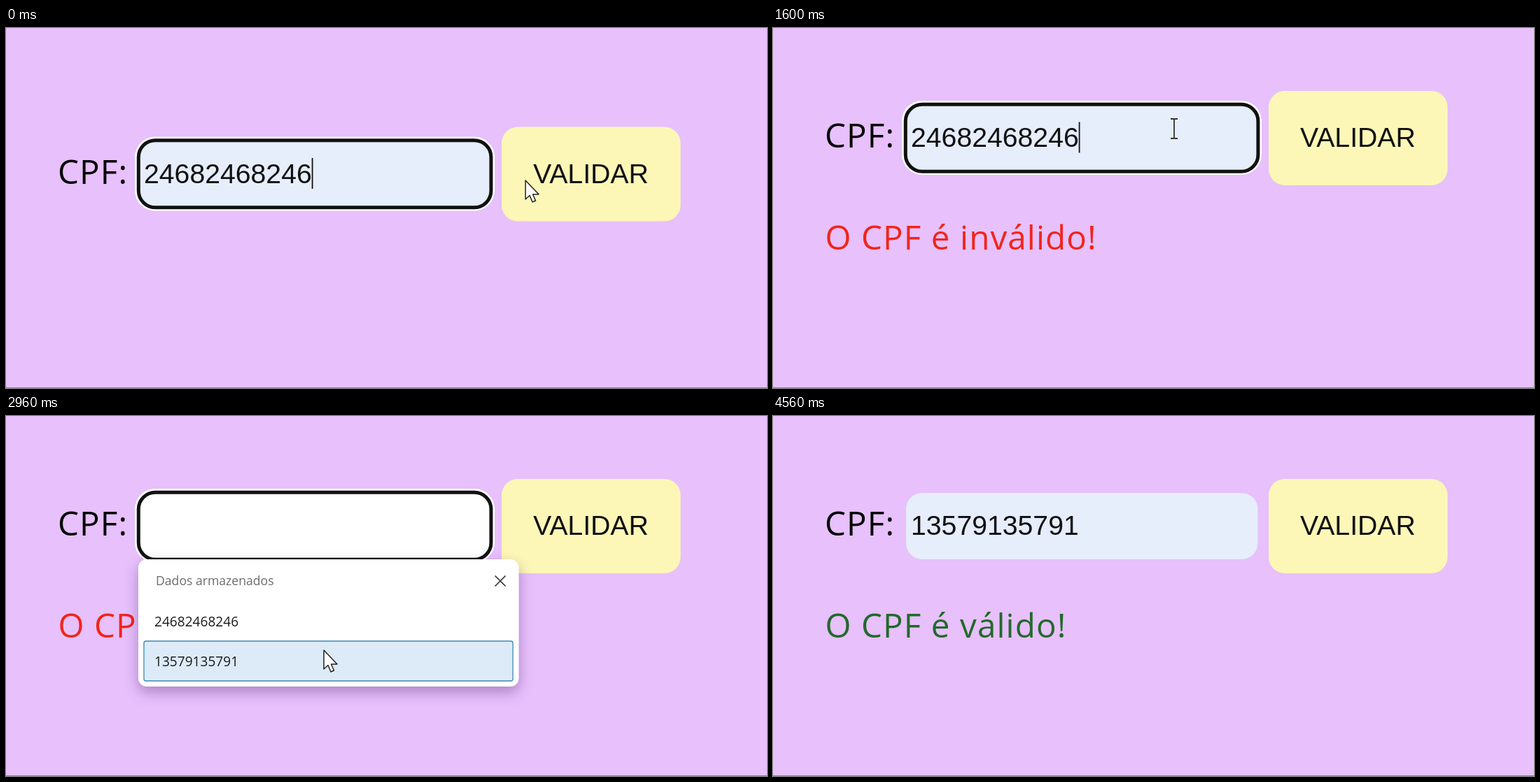
These frames come from a looping animation (1087x515 px, 4.64 s). An HTML page:

```html
<!DOCTYPE html>
<html lang="pt-BR">
<head>
<meta charset="utf-8">
<title>Validador de CPF</title>
<style>
  html, body { margin: 0; width: 100%; height: 100%; overflow: hidden; background: #e7c0fc; }
  svg { display: block; width: 100vw; height: 100vh; }
  .label { font: 47.5px "Open Sans", "Noto Sans", sans-serif; letter-spacing: 1.1px; }
  .field { font: 39.2px "Liberation Sans", Arial, sans-serif; fill: #111; }
  .item { font: 19.1px "Open Sans", "Noto Sans", sans-serif; fill: #1c1c1c; }
  .title { font: 17.6px "Open Sans", "Noto Sans", sans-serif; fill: #6c6c6c; }
  #popup > rect:first-child { filter: drop-shadow(0 8px 10px rgba(70, 20, 95, .36)); }
</style>
</head>
<body>
<svg viewBox="0 0 1087 515">
  <rect y="514" width="1087" height="1" fill="#927b9f"/>
  <g id="form">
    <text class="label" x="74" y="171">CPF:</text>
    <rect id="halo" x="184" y="104" width="514" height="106" rx="29" fill="#fff"/>
    <rect id="box" x="190" y="110" width="502.5" height="95" rx="23"/>
    <rect id="ring" x="189.3" y="109.3" width="503.6" height="96" rx="24" fill="none" stroke="#111" stroke-width="5"/>
    <rect id="selection" x="196" y="134" width="241" height="45" fill="#2c61d3"/>
    <text id="value" class="field" x="197" y="170"></text>
    <rect id="caret" x="436.7" y="134.5" width="1.8" height="44" fill="#111"/>
    <rect x="708" y="90" width="255.5" height="135" rx="23" fill="#fdf7b7"/>
    <text class="field" x="753" y="170">VALIDAR</text>
  </g>
  <text id="message" class="label" x="74.5" y="317"></text>
  <g id="popup">
    <rect x="189" y="205" width="543.5" height="182" rx="12" fill="#fff"/>
    <text class="title" x="214" y="242">Dados armazenados</text>
    <path d="M698.5 228.5l15 15m0-15l-15 15" stroke="#333" stroke-width="1.7"/>
    <rect id="hover" x="197" width="527" height="57" rx="3" fill="#ddebf8" stroke="#3d87b5" stroke-width="1.3"/>
    <text id="first" class="item" x="212" y="301"></text>
    <text id="second" class="item" x="212" y="358"></text>
  </g>
  <path id="arrow" d="M0 0V27L6 21.5L10 31L14.5 29L10.5 20H19Z" fill="#fff" stroke="#222" stroke-width="1.5" stroke-linejoin="round"/>
  <path id="beam" d="M-5-14h4l1 1 1-1h4M0-13v26M-5 14h4l1-1 1 1h4" fill="none" stroke="#333" stroke-width="1.8"/>
</svg>
<script>
const LOOP = 4640, STEP = 80;
const BAD = "24682468246", GOOD = "13579135791";
const path = [
  [0, 742, 218], [400, 808, 212], [640, 808, 212], [1040, 573, 144],
  [2640, 573, 144], [2960, 454, 335], [3280, 454, 335], [3840, 849, 159], [LOOP, 849, 159]
];
const $ = id => document.getElementById(id);
const show = (id, on) => $(id).setAttribute("visibility", on ? "visible" : "hidden");
const within = (t, a, b) => t >= a && t < b;

function pointer(t) {
  const i = path.findIndex(p => p[0] > t);
  const [t0, x0, y0] = path[i - 1], [t1, x1, y1] = path[i];
  const u = (t - t0) / (t1 - t0), k = u * u * (3 - 2 * u);
  return [x0 + (x1 - x0) * k, y0 + (y1 - y0) * k];
}

function draw(t) {
  const [x, y] = pointer(t);
  const drop = t < 480 ? 51.5 : 0;
  const focused = t < 400 || within(t, 1040, 3920);
  const selected = within(t, 1760, 2640);
  const empty = within(t, 2640, 3360);
  const open = within(t, 2720, 3360);
  const valid = t >= 4080;

  $("form").setAttribute("transform", `translate(0 ${drop})`);
  show("halo", focused);
  show("ring", focused);
  $("box").setAttribute("fill", empty ? "#fff" : "#e6edfb");
  show("selection", selected);
  $("value").textContent = empty ? "" : t < 2640 ? BAD : GOOD;
  $("value").style.fill = selected ? "#eef3fd" : "#111";
  show("caret", focused && !selected && !empty);

  $("message").textContent = drop ? "" : valid ? "O CPF é válido!" : "O CPF é inválido!";
  $("message").setAttribute("fill", valid ? "#22692a" : "#f2241a");

  $("popup").style.display = open ? "" : "none";
  $("hover").setAttribute("y", y > 322 ? 322 : 265);
  show("hover", open && y > 265);

  const inField = within(x, 190, 692) && within(y - drop, 110, 205);
  const visible = t < 4480;
  for (const id of ["arrow", "beam"]) {
    $(id).setAttribute("transform", `translate(${x} ${y})`);
    show(id, visible && inField === (id === "beam"));
  }
}

$("first").textContent = BAD;
$("second").textContent = GOOD;
const start = performance.now();
function tick() {
  const t = (performance.now() - start) % LOOP;
  draw(Math.floor(t / STEP) * STEP);
  requestAnimationFrame(tick);
}
tick();
</script>
</body>
</html>
```
